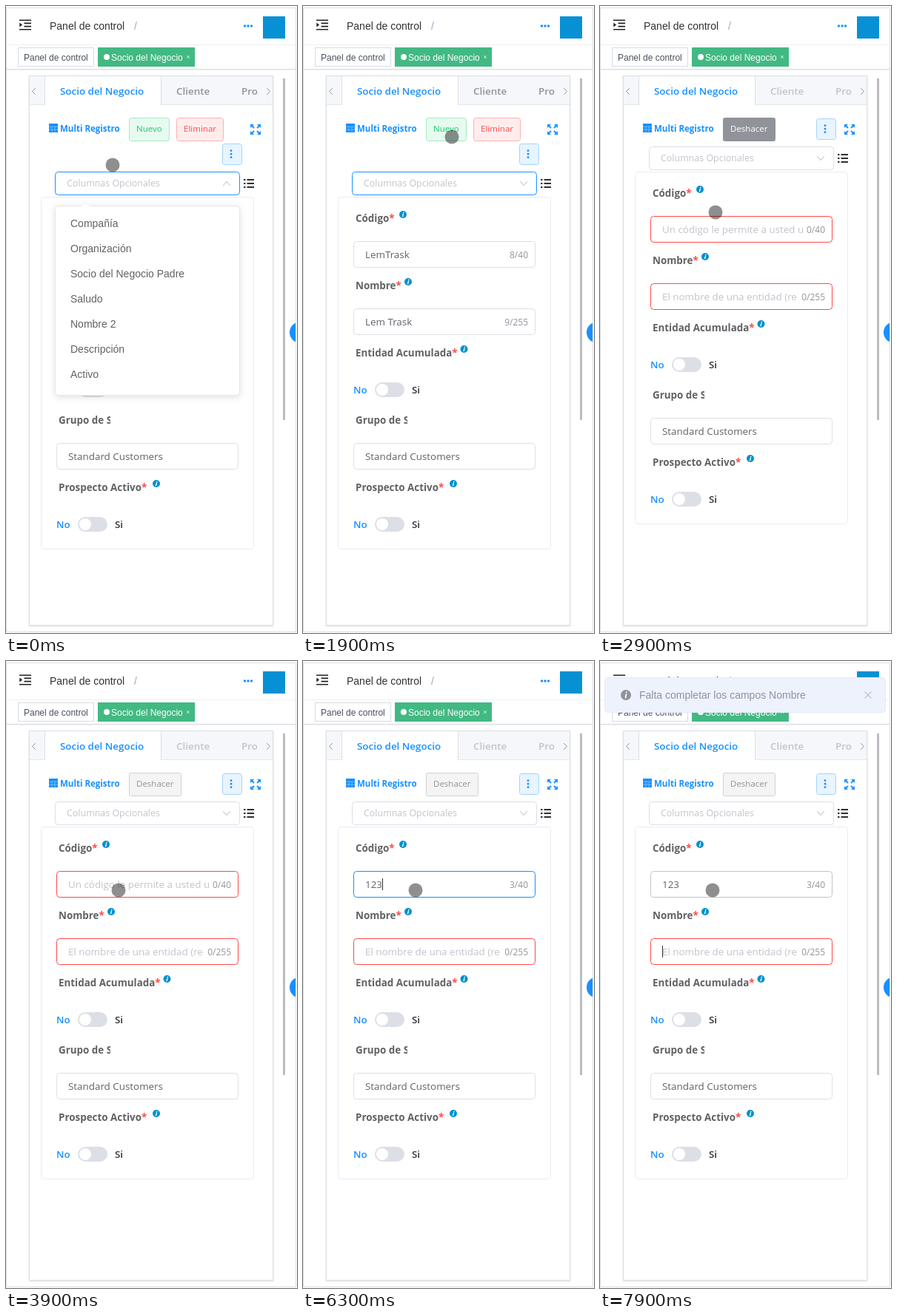
These frames come from a looping animation (393x848 px, 8 s). An HTML page:

```html
<!DOCTYPE html>
<html lang="es">
<head>
<meta charset="utf-8">
<title>Panel de control</title>
<style>
  html, body { margin: 0; width: 100%; height: 100%; overflow: hidden; background: #fff; }
  svg { display: block; width: 100%; height: 100%; }
  text { font: 13.4px "Open Sans", "Noto Sans", sans-serif; fill: #606266; white-space: pre; }
  .plain { font: 14px "Liberation Sans", Arial, sans-serif; }
  .tag { font: 12px "Liberation Sans", Arial, sans-serif; fill: #495060; }
  .medium { font-weight: 600; }
  .label { font-weight: 700; }
  .small { font-size: 11.5px; }
  .count { font-size: 12px; fill: #909399; text-anchor: end; }
  .hint { fill: #c0c4cc; }
  .blue { fill: #1890ff; }
  .red { fill: #ff4949; }
  .box { fill: #fff; stroke: #dcdfe6; }
  .line { fill: none; stroke-linecap: round; stroke-linejoin: round; }

  /* --t holds the loop time in ms; every keyframe timeline spans the whole loop */
  .anim { animation: 8s linear calc(var(--t, 0) * -1ms) infinite paused; }
  .step { animation-timing-function: step-end; }
  .before { animation-name: before; }
  .after { animation-name: after; }
  .shift { animation-name: shift; }
  .tab { animation-name: tab; }
  .select { animation-name: select; }
  .code { animation-name: code; }
  .name { animation-name: name; }
  .undo { animation-name: undo; }
  .undo-text { animation-name: undo-text; }
  .menu { animation-name: menu; transform-origin: 191px 265px; }
  .chevron { animation-name: chevron; transform-origin: 298px 240px; }
  .cursor { animation-name: cursor; }
  .notice { animation-name: notice; }

  @keyframes before { 0% { opacity: 1 } 27.4%, 100% { opacity: 0 } }
  @keyframes after { 0% { opacity: 0 } 27.4%, 100% { opacity: 1 } }
  @keyframes shift { 0% { transform: none } 27.4%, 100% { transform: translateY(-34px) } }
  @keyframes tab { 0%, 27% { fill: #909399 } 30%, 100% { fill: #c0c4cc } }
  @keyframes select { 0%, 27% { stroke: #1890ff } 30%, 100% { stroke: #dcdfe6 } }
  @keyframes code {
    0%, 27% { stroke: #dcdfe6 } 30%, 52% { stroke: #ff4949 }
    55%, 93.2% { stroke: #1890ff } 96.2%, 100% { stroke: #c0c4cc }
  }
  @keyframes name { 0%, 27% { stroke: #dcdfe6 } 30%, 100% { stroke: #ff4949 } }
  @keyframes undo {
    0%, 42% { fill: #909399; stroke: #909399 }
    43.7%, 100% { fill: #f4f4f5; stroke: #d0d1d4 }
  }
  @keyframes undo-text { 0%, 42% { fill: #fff } 43.7%, 100% { fill: #909399 } }
  @keyframes menu {
    0%, .6% { opacity: 1; transform: none; animation-timing-function: cubic-bezier(.23, 1, .32, 1) }
    4.8%, 100% { opacity: 0; transform: scaleY(0) }
  }
  @keyframes chevron {
    0%, .6% { transform: rotate(180deg); animation-timing-function: ease }
    4.8%, 100% { transform: none }
  }
  @keyframes cursor {
    0%, 1% { transform: translate(144px, 215px) }
    5%, 7.5% { transform: translate(145px, 204px) }
    8.75% { transform: translate(183px, 210px) }
    12.5% { transform: translate(241px, 226px) }
    15% { transform: translate(236px, 212px) }
    18.75% { transform: translate(209px, 185px) }
    23.75%, 32.5% { transform: translate(201px, 177px) }
    33.75% { transform: translate(198px, 187px) }
    35% { transform: translate(176px, 243px) }
    36.25% { transform: translate(156px, 279px) }
    37.5% { transform: translate(153px, 296px) }
    40%, 100% { transform: translate(152px, 310px) }
  }
  @keyframes notice {
    0%, 92.95% { opacity: 0; transform: translateY(-48px); animation-timing-function: ease }
    97.95%, 100% { opacity: 1; transform: none }
  }
</style>
</head>
<body>
<svg viewBox="0 0 393 848">
  <defs>
    <g id="info">
      <circle r="5" fill="#0090d0"/>
      <path d="M.9-2.7L.7-2.2M.4-.6L-.4 2.6" stroke="#fff" stroke-width="1.4" class="line"/>
    </g>
    <g id="toggle">
      <text x="68" y="5" class="medium blue">No</text>
      <rect x="97" y="-10" width="40" height="20" rx="10" fill="#dcdfe6"/>
      <circle cx="107" r="8" fill="#fff"/>
      <text x="147" y="5" class="medium" style="fill:#303133">Si</text>
    </g>
    <g id="corner" fill="#1890ff">
      <path d="M-7-7h5l-5 5z"/>
      <path d="M-5.500-5.500L-2-2" stroke="#1890ff" stroke-width="2"/>
    </g>
    <clipPath id="code-clip"><path d="M84 310H274V360H84z"/></clipPath>
    <clipPath id="name-clip"><path d="M84 400H267V450H84z"/></clipPath>
    <clipPath id="group-clip"><path d="M60 545H141V575H60z"/></clipPath>
    <clipPath id="page-clip"><path d="M0 0H391V848H0z"/></clipPath>
    <filter id="soft" x="-10%" y="-10%" width="120%" height="120%">
      <feDropShadow dx="0" dy="2" stdDeviation="5" flood-opacity=".12"/>
    </filter>
    <filter id="thin" x="-5%" y="-20%" width="110%" height="150%">
      <feDropShadow dx="0" dy="1" stdDeviation="1.200" flood-opacity=".14"/>
    </filter>
  </defs>

  <rect width="393" height="848" fill="#fff"/>

  <!-- Header -->
  <rect x="0" y="53" width="391" height="32" fill="#fff" filter="url(#thin)"/>
  <path d="M0 85.500H391" stroke="#d8dce5"/>
  <path d="M0 52.500H391" stroke="#f0f1f3"/>
  <path d="M.5 2.500H391.500V846.500H.5z" fill="none" stroke="#dedede"/>
  <path d="M18 19.200H34M24.500 23.400H34M24.500 27.600H34M18 31.800H34" stroke="#222" stroke-width="1.600"/>
  <path d="M18.300 22.500v6l3.700-3z" fill="#222"/>
  <text x="59" y="32" class="plain" style="fill:#303133">Panel de control</text>
  <text x="173" y="32" class="plain" style="fill:#97a8be">/</text>
  <g class="blue"><circle cx="322.500" cy="27" r="1.700"/><circle cx="327" cy="27" r="1.700"/><circle cx="331.500" cy="27" r="1.700"/></g>
  <rect x="347" y="14" width="30" height="30" fill="#0890d4"/>

  <rect x="16.500" y="56.500" width="102" height="25" class="box" style="stroke:#d8dce5"/>
  <text x="24" y="74" class="tag">Panel de control</text>
  <rect x="124" y="56" width="131" height="26" fill="#42b983"/>
  <circle cx="136" cy="69" r="4" fill="#fff"/>
  <text x="142" y="74" class="tag" style="fill:#fff">Socio del Negocio</text>
  <path d="M244 67l4 4m0-4l-4 4" stroke="#d4f0e3" stroke-width=".9"/>

  <!-- Tab card -->
  <rect x="31.500" y="94.500" width="329" height="743" class="box" filter="url(#thin)"/>
  <path d="M32 95H360V133H32z" fill="#f5f7fa"/>
  <path d="M32 133.500H360" stroke="#e4e7ed"/>
  <path d="M53 95H209V134H53z" fill="#fff"/>
  <path d="M52.500 95V133.500M209.500 95V133.500" stroke="#dcdfe6"/>
  <path d="M39.500 111.500l-4 4 4 4M352.500 111.500l4 4-4 4" class="line" stroke="#909399"/>
  <text x="73" y="120" class="medium blue">Socio del Negocio</text>
  <text x="230" y="120" class="medium anim tab">Cliente</text>
  <text x="318" y="120" class="medium anim tab">Pro</text>

  <rect x="374" y="98" width="3" height="462" fill="#bdbdbf"/>
  <circle cx="397" cy="441.500" r="14" class="blue" clip-path="url(#page-clip)"/>

  <!-- Toolbar -->
  <rect x="58" y="159" width="12" height="12" class="blue"/>
  <path d="M58 163.200H70M58 167.200H70M62 163V171M66 163V171" stroke="#9dcfff" stroke-width=".6"/>
  <text x="73" y="170" class="label small blue">Multi Registro</text>
  <g class="anim step before">
    <rect x="166.500" y="151.500" width="54" height="31" rx="3" fill="#e7faf0" stroke="#a1ebc2"/>
    <text x="176" y="170" class="small" style="fill:#13ce66">Nuevo</text>
    <rect x="230.500" y="151.500" width="63" height="31" rx="3" fill="#ffeded" stroke="#ffb0b0"/>
    <text x="240" y="170" class="small red">Eliminar</text>
  </g>
  <g class="anim step after">
    <rect x="166.500" y="151.500" width="70" height="31" rx="2" class="anim undo"/>
    <text x="176" y="170" class="small anim undo-text">Deshacer</text>
  </g>
  <g transform="translate(337 167)">
    <use href="#corner"/><use href="#corner" transform="rotate(90)"/>
    <use href="#corner" transform="rotate(180)"/><use href="#corner" transform="rotate(270)"/>
  </g>

  <!-- Everything that moves up when a new record starts -->
  <g class="anim step shift">
    <rect x="292.500" y="186.500" width="26" height="28" rx="3" fill="#e8f4ff" stroke="#a3d3ff"/>
    <g class="blue"><circle cx="304" cy="195.700" r="1.400"/><circle cx="304" cy="200.200" r="1.400"/><circle cx="304" cy="204.700" r="1.400"/></g>
    <rect x="66.500" y="224.500" width="249" height="31" rx="4" class="box anim select"/>
    <text x="82" y="244" class="hint" style="font-size:12.450px">Columnas Opcionales</text>
    <path d="M293.500 237.500l4.500 5 4.500-5" class="line anim chevron" stroke="#c0c4cc" stroke-width="1.100"/>
    <path d="M321 235h2.500M321 240h2.500M321 245h2.500M325.500 235H335M325.500 240H335M325.500 245H335" stroke="#303133" stroke-width="2"/>

    <rect x="47.500" y="258.500" width="287" height="476" rx="4" class="box" style="stroke:#e6ebf5"/>

    <text x="71" y="292" class="label">Código<tspan class="red">*</tspan></text>
    <use href="#info" x="135" y="282"/>
    <rect x="68.500" y="318.500" width="245" height="35" rx="4" class="box anim code"/>
    <text id="code" x="84" y="341" clip-path="url(#code-clip)"></text>
    <text id="code-count" x="304" y="341" class="count"></text>

    <text x="71" y="383" class="label">Nombre<tspan class="red">*</tspan></text>
    <use href="#info" x="142" y="373"/>
    <rect x="68.500" y="409.500" width="245" height="35" rx="4" class="box anim name"/>
    <text id="name" x="84" y="432" clip-path="url(#name-clip)"></text>
    <text id="name-count" x="304" y="432" class="count"></text>

    <text x="71" y="474" class="label">Entidad Acumulada<tspan class="red">*</tspan></text>
    <use href="#info" x="217.500" y="464"/>
    <use href="#toggle" y="519"/>

    <text x="71" y="565" class="label" clip-path="url(#group-clip)">Grupo de Socio</text>
    <rect x="68.500" y="591.500" width="245" height="35" rx="4" class="box"/>
    <text x="84" y="614">Standard Customers</text>

    <text x="71" y="656" class="label">Prospecto Activo<tspan class="red">*</tspan></text>
    <use href="#info" x="203" y="646"/>
    <use href="#toggle" y="701"/>
  </g>
  <rect id="caret" width="1" height="16" fill="#303133"/>

  <g class="anim menu">
    <rect x="66.500" y="270.500" width="249" height="256" rx="4" class="box" style="stroke:#e4e7ed" filter="url(#soft)"/>
    <path d="M101.500 271l6-5.500 6 5.500" fill="#fff" stroke="#ebeef5"/>
    <path d="M102 271.500h11" stroke="#fff"/>
    <g id="options"></g>
  </g>

  <circle r="9.500" fill="#000" fill-opacity=".44" class="anim cursor"/>

  <g id="notice" class="anim notice">
    <rect x="6.500" y="22.500" width="379" height="47" rx="4" fill="#edf2fc" stroke="#e6eaf4"/>
    <circle cx="35" cy="46" r="7" fill="#909399"/>
    <path d="M35.800 42.200v.2M35.300 45.200l-.7 4.400" class="line" stroke="#fff" stroke-width="1.800"/>
    <text x="53" y="51" class="plain" style="fill:#909399">Falta completar los campos Nombre</text>
    <path d="M357.500 41.500l9 9m0-9l-9 9" stroke="#c0c4cc" stroke-width="1.200"/>
  </g>
</svg>
<script>
  const LOOP = 8000, FRAME = 100;
  const NEW_RECORD = 2200, FOCUS = 3400, NEXT_FIELD = 7500;
  const KEYS = [4200, 4900, 5300];
  const CARET_EVENTS = [FOCUS, ...KEYS, NEXT_FIELD];
  const $ = id => document.getElementById(id);

  $('options').innerHTML = ['Compañía', 'Organización', 'Socio del Negocio Padre', 'Saludo', 'Nombre 2', 'Descripción', 'Activo']
    .map((label, i) => `<text x="87" y="${299 + 34 * i}" class="plain">${label}</text>`).join('');

  function setField(id, value, hint, max) {
    $(id).textContent = value || hint;
    $(id).classList.toggle('hint', !value);
    $(id + '-count').textContent = `${value.length}/${max}`;
  }

  function render(t) {
    document.documentElement.style.setProperty('--t', t);
    const fresh = t >= NEW_RECORD;
    const typed = KEYS.filter(k => t >= k).length;
    setField('code', fresh ? '123'.slice(0, typed) : 'LemTrask', 'Un código le permite a usted utilizar', 40);
    setField('name', fresh ? '' : 'Lem Trask', 'El nombre de una entidad (requerido', 255);

    const last = CARET_EVENTS.filter(e => t >= e).pop();
    const shown = last !== undefined && Math.floor((t - last) / 500) % 2 === 0;
    const inName = t >= NEXT_FIELD;
    $('caret').setAttribute('x', inName ? 84 : Math.round(84 + 7.66 * typed));
    $('caret').setAttribute('y', inName ? 385 : 294);
    $('caret').style.opacity = shown ? 1 : 0;
    $('notice').style.visibility = inName ? 'visible' : 'hidden';
  }

  function tick() {
    render(Math.floor((performance.now() + 5) / FRAME) * FRAME % LOOP);
    requestAnimationFrame(tick);
  }
  tick();
</script>
</body>
</html>
```
